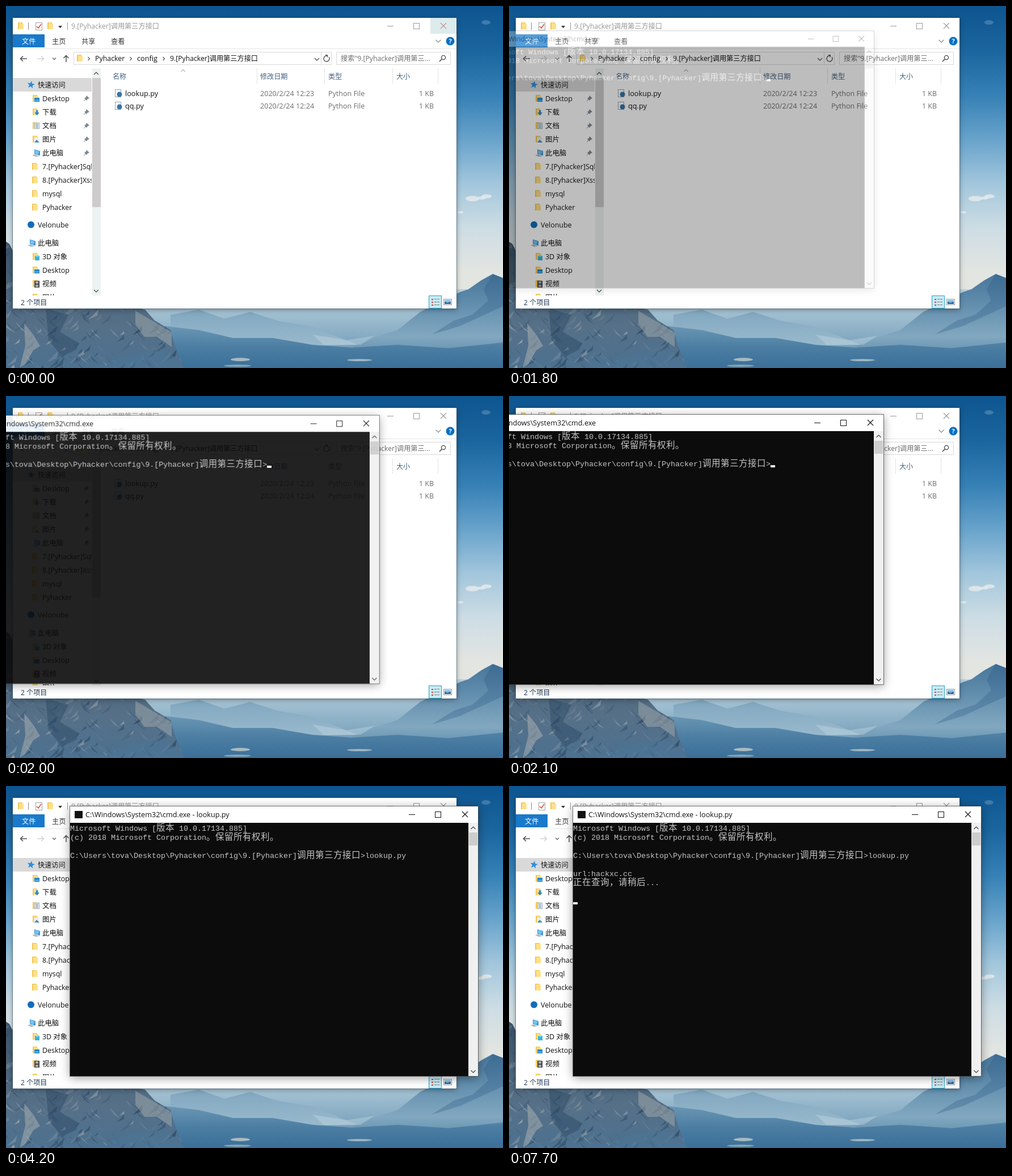
An HTML page with a canvas that plays this animation: 876 px wide and 639 px high, repeating every 8 s.

```html
<!DOCTYPE html>
<html lang="zh">
<head>
<meta charset="utf-8">
<title>Command line lookup</title>
<style>
html, body { margin: 0; width: 100%; height: 100%; overflow: hidden; background: #0d5590; }
canvas { display: block; }
</style>
</head>
<body>
<canvas id="stage" width="876" height="639"></canvas>
<script>
const W = 876, H = 639, LOOP = 8000;
const UI = '"Open Sans", "Noto Sans CJK SC", sans-serif';
const MONO = '"Liberation Mono", "Noto Sans CJK SC", monospace';
const SERIF = '"Liberation Serif", "Noto Sans CJK SC", serif';
const FOLDER = '9.[Pyhacker]调用第三方接口';
const PATH = 'C:\\Users\\tova\\Desktop\\Pyhacker\\config\\' + FOLDER;

let g = document.getElementById('stage').getContext('2d');

function layer(w, h, paint) {
  const c = document.createElement('canvas');
  c.width = w;
  c.height = h;
  const before = g;
  g = c.getContext('2d');
  paint();
  g = before;
  return c;
}

function box(x, y, w, h, color) {
  g.fillStyle = color;
  g.fillRect(x, y, w, h);
}

function frame(x, y, w, h, color) {
  g.strokeStyle = color;
  g.lineWidth = 1;
  g.strokeRect(x + .5, y + .5, w - 1, h - 1);
}

function trace(p) {
  g.beginPath();
  for (let i = 0; i < p.length; i += 2) g.lineTo(p[i], p[i + 1]);
}

function poly(color, ...p) {
  g.fillStyle = color;
  trace(p);
  g.fill();
}

function line(color, width, ...p) {
  g.strokeStyle = color;
  g.lineWidth = width;
  trace(p);
  g.stroke();
}

function disc(x, y, rx, color, ry = rx) {
  g.fillStyle = color;
  g.beginPath();
  g.ellipse(x, y, rx, ry, 0, 0, 7);
  g.fill();
}

// y is the middle of the text line
function text(s, x, y, color = '#111', size = 12.4, align = 'left') {
  g.font = size + 'px ' + UI;
  g.fillStyle = color;
  g.textAlign = align;
  g.fillText(s, x, y + 4.5);
}

function chevron(x, y, dir, color = '#555', r = 4, width = 1.2) {
  g.save();
  g.translate(x, y);
  g.rotate({ down: 0, left: 1, up: 2, right: 3 }[dir] * Math.PI / 2);
  line(color, width, -r, -r / 2, 0, r / 2, r, -r / 2);
  g.restore();
}

function arrow(x, y, angle, color) {
  g.save();
  g.translate(x, y);
  g.rotate(angle);
  line(color, 1.4, 6, 0, -5.5, 0);
  line(color, 1.4, -1, -4.5, -5.5, 0, -1, 4.5);
  g.restore();
}

function windowButtons(x, y, color, closeColor = color) {
  line(color, 1, x - 5, y + .5, x + 6, y + .5);
  frame(x + 41, y - 5, 11, 11, color);
  line(closeColor, 1.1, x + 89, y - 5, x + 99, y + 5);
  line(closeColor, 1.1, x + 99, y - 5, x + 89, y + 5);
}

function linear(y0, y1, ...colors) {
  const grad = g.createLinearGradient(0, y0, 0, y1);
  colors.forEach((c, i) => grad.addColorStop(i / (colors.length - 1), c));
  return grad;
}

function random(seed) {
  return () => (seed = (seed * 16807) % 2147483647) / 2147483647;
}

// ---------- wallpaper ----------

function paintRocks() {
  g.save();
  trace([0, 416, 6, 420, 14, 436, 120, 470, 225, 532, 245, 536, 262, 555, 290, 572, 298, 600, 314, 639, 0, 639]);
  g.clip();
  box(0, 400, 400, 239, linear(416, 639, '#3a5268', '#4a6379', '#567088', '#4c7190'));
  const rnd = random(77);
  const tones = ['#2a425a', '#334d66', '#6a7f91', '#94a0a8', '#b0b5b6', '#2c4c69'];
  for (let i = 0; i < 420; i++) {
    const x = rnd() * 320 - 10, y = 420 + rnd() * 215;
    const len = 6 + rnd() * 18, side = rnd() < .4 ? -1 : 1, thick = 1 + rnd() * 4;
    g.globalAlpha = .25 + rnd() * .45;
    poly(tones[Math.floor(rnd() * 6)], x, y, x + side * len * .5, y + len * .55, x + side * len, y + len, x + side * len * .3 + thick, y + len * .6);
  }
  g.globalAlpha = .5;
  poly('#2e4b66', 70, 534, 110, 545, 95, 575, 130, 596, 100, 620, 75, 590);
  poly('#a2a9ac', 228, 538, 262, 558, 292, 576, 292, 602, 266, 584, 244, 584, 228, 562);
  poly('#b0b3b4', 32, 560, 48, 580, 60, 600, 48, 608, 34, 632, 24, 639, 34, 600);
  poly('#4c7698', 150, 639, 220, 614, 285, 608, 314, 639);
  g.restore();
}

function paintWallpaper() {
  box(0, 0, W, H, linear(0, 470, '#0d5590', '#1b659e', '#3580b5', '#68a3cb', '#a2c6dc', '#cddde4', '#e3e5e1'));
  for (const [x, y, r] of [[847, 336, 9], [838, 339, 7], [822, 340, 12], [801, 364, 5]]) disc(x, y, r, 'rgba(240,240,238,.7)', r * .4);
  disc(846, 29, 8, 'rgba(150,180,205,.35)', 4);

  box(0, 500, W, 139, linear(500, 639, '#bdd2dd', '#9fbed0', '#7fa6c0', '#5686a9'));
  poly(linear(530, 605, '#7ea5be', '#9bbbce'),
    290, 545, 340, 536, 385, 552, 430, 540, 480, 556, 540, 566, 620, 598, 290, 605);
  poly(linear(473, 639, '#47759a', '#638fae', '#82a8c0', '#4f7fa3'),
    600, 606, 640, 588, 690, 572, 730, 540, 770, 520, 800, 505, 815, 500, 838, 484, 858, 473, 876, 480, 876, 639, 600, 639);
  poly('rgba(40,88,128,.3)', 858, 473, 842, 500, 850, 520, 822, 545, 790, 555, 750, 580, 800, 565, 876, 530, 876, 480);
  poly('rgba(200,220,230,.35)', 540, 580, 600, 590, 650, 582, 625, 598, 560, 598);
  poly(linear(565, 639, '#6a96b3', '#4c7ea3', '#3b6f98'),
    280, 565, 340, 572, 400, 586, 470, 586, 540, 598, 610, 603, 690, 598, 780, 604, 876, 594, 876, 639, 280, 639);
  disc(413, 624, 17, '#a7bac0', 3);
  disc(408, 635, 24, '#83a4b6', 2);
  disc(623, 625, 22, '#9db6c0', 2);
  paintRocks();
}

// ---------- file manager ----------

function folder(x, y) {
  poly('#f2c755', x, y - 6, x + 8, y - 6, x + 8, y + 6, x, y + 6);
  poly('#ffe08a', x + 2, y - 5, x + 10, y - 4, x + 10, y + 6, x + 2, y + 6);
}

function page(x, y, w = 10, h = 13) {
  box(x, y - h / 2, w, h, '#fff');
  frame(Math.round(x), Math.round(y - h / 2), w, h, '#9aa3ab');
}

function monitor(x, y) {
  poly('#3f95d4', x + 3, y - 6, x + 13, y - 3, x + 13, y + 5, x + 3, y + 2);
  poly('#76c3f2', x + 4, y - 5, x + 12, y - 2, x + 9, y + 3, x + 4, y + 1);
  poly('#a9b4bc', x - 1, y + 4, x + 4, y + 3, x + 12, y + 6, x + 5, y + 7);
}

function star(x, y) {
  const p = [];
  for (let i = 0; i < 10; i++) {
    const a = i * Math.PI / 5 - 1.4, r = i % 2 ? 3 : 7;
    p.push(x + r * Math.cos(a), y + r * Math.sin(a));
  }
  poly('#2c8fe0', ...p);
}

function pin(x, y) {
  poly('#7d8790', x, y - 5, x + 5, y, x + 2, y + 1, x, y + 4, x - 4, y, x - 1, y - 2);
  line('#7d8790', 1, x - 2, y + 2, x - 5, y + 5);
}

const icons = {
  folder: y => folder(46, y),
  desktop: y => { folder(47, y); box(50, y - 1, 9, 7, '#1e88d2'); box(51, y + 3, 7, 1, '#9bd4f7'); },
  down: y => { folder(47, y); box(53, y - 3, 3, 5, '#2387d6'); poly('#2387d6', 50, y + 1, 59, y + 1, 54.5, y + 6); },
  doc: y => { folder(47, y); page(50, y, 9, 11); for (let i = -3; i < 5; i += 2) box(52, y + i, 5, 1, '#5b8fb9'); },
  pic: y => { folder(47, y); box(50, y - 2, 9, 8, '#e8f3fa'); poly('#4d8bb5', 50, y + 6, 54, y + 1, 59, y + 6); },
  pc: y => monitor(47, y),
  cube: y => { folder(47, y); box(51, y - 1, 8, 8, '#38b4d8'); poly('#8be0f2', 51, y - 1, 55, y - 3, 59, y - 1, 55, y + 1); },
  video: y => { folder(47, y); box(50, y - 5, 9, 12, '#444'); box(52, y - 4, 5, 4, '#aab'); box(52, y + 2, 5, 4, '#aab'); },
};

const places = [
  ['desktop', 'Desktop', 163, 1], ['down', '下载', 187, 1], ['doc', '文档', 211, 1], ['pic', '图片', 235, 1],
  ['pc', '此电脑', 259, 1], ['folder', '7.[Pyhacker]Sql', 283], ['folder', '8.[Pyhacker]Xss', 307],
  ['folder', 'mysql', 331], ['folder', 'Pyhacker', 355], ['cube', '3D 对象', 442],
  ['desktop', 'Desktop', 466], ['video', '视频', 490], ['pic', '图片', 514],
];

function paintSidebar() {
  g.save();
  g.beginPath();
  g.rect(12, 110, 139, 401);
  g.clip();
  box(12, 127, 139, 24, '#d9d9d9');
  star(44, 139);
  text('快速访问', 56, 139, '#111', 12.2);
  for (const [icon, name, y, pinned] of places) {
    icons[icon](y);
    text(name, 64, y);
    if (pinned) pin(142, y);
  }
  disc(44, 386, 6, '#0f6cbd');
  text('Velonube', 56, 386);
  monitor(39, 418);
  text('此电脑', 56, 418);
  g.restore();
  box(152, 110, 15, 401, '#edf3f2');
  box(152, 127, 15, 228, '#cdcbcb');
  chevron(159, 119, 'up', '#444');
  chevron(159, 503, 'down', '#444');
}

function paintFiles() {
  const head = '#43607f';
  [['名称', 188], ['修改日期', 448], ['类型', 568], ['大小', 688]].forEach(([s, x]) => text(s, x, 124, head, 12.1));
  chevron(312, 114, 'up', '#777', 3.5, 1);
  for (const x of [442, 561, 681, 761]) box(x, 110, 1, 27, '#e2e2e2');
  [['lookup.py', 154, '23'], ['qq.py', 176, '24']].forEach(([name, y, min]) => {
    page(192, y, 11, 14);
    disc(200, y + 2, 4.5, '#3774a8');
    text(name, 210, y, '#111', 12.7);
    text('2020/2/24 12:' + min, 448, y, '#6d6d6d', 12.6);
    text('Python File', 568, y, '#6d6d6d', 12.5);
    text('1 KB', 754, y, '#6d6d6d', 12.4, 'right');
  });
}

function paintAddress(t, editing) {
  arrow(31, 93, 0, '#444');
  arrow(61, 93, Math.PI, '#d0d0d0');
  chevron(85, 93, 'down', '#666', 3, 1.3);
  arrow(106, 93, Math.PI / 2, '#444');

  frame(119, 81, 455, 23, '#d9d9d9');
  box(555, 82, 1, 21, '#d9d9d9');
  if (editing) frame(120, 81, 436, 23, '#0078d7');
  folder(125, 92);
  if (!editing) {
    [146, 220, 278].forEach(x => chevron(x, 93, 'right', '#555', 3));
    text('Pyhacker', 157, 92);
    text('config', 231, 92, '#111', 12.7);
    text(FOLDER, 289, 92, '#111', 12.2);
  } else if (t < 1500) {
    box(143, 84, 389, 17, '#0078d7');
    text(PATH, 143, 92, '#fff', 12.35);
    if (t < 1100) box(531, 84, 1, 17, '#111');
  } else {
    text('cmd', 143, 92);
    box(169, 84, 1, 17, '#111');
  }
  chevron(548, 94, 'down', '#555', 4, 1.3);
  g.strokeStyle = '#555';
  g.lineWidth = 1.4;
  g.beginPath();
  g.arc(565, 93, 5, -.6, 4.4);
  g.stroke();
  poly('#555', 562, 86, 567, 86, 567, 91);

  frame(582, 81, 202, 23, '#d9d9d9');
  text('搜索"9.[Pyhacker]调用第三...', 590, 92, '#6d6d6d', 12.2);
  g.strokeStyle = '#444';
  g.lineWidth = 1.3;
  g.beginPath();
  g.arc(771, 91, 3.6, 0, 7);
  g.stroke();
  line('#444', 1.6, 768, 94, 764, 98);
}

function paintExplorer(t) {
  const editing = t >= 500 && t < 1800;
  const raised = t >= 600 && t < 1800;
  const ink = editing ? '#111' : '#999';
  g.save();
  g.shadowColor = raised ? 'rgba(0,0,0,.5)' : 'rgba(0,0,0,.35)';
  g.shadowBlur = raised ? 18 : 9;
  g.shadowOffsetY = 2;
  box(12, 21, 782, 513, '#fff');
  g.restore();
  frame(11, 20, 784, 515, 'rgba(50,80,105,.55)');

  folder(21, 35);
  box(39, 29, 1, 13, '#888');
  page(52, 36, 12, 14);
  line('#d9532c', 1.6, 54, 36, 57, 39, 62, 32);
  folder(73, 35);
  poly('#333', 92, 35, 99, 35, 95.5, 39);
  box(108, 29, 1, 13, '#999');
  text(FOLDER, 115, 35, ink, 12.2);
  if (t < 100) box(748, 21, 46, 28, '#dcebec');
  windowButtons(677, 35, ink, t < 100 ? '#c58f8f' : ink);

  box(12, 50, 56, 23, '#1979ca');
  text('文件', 28, 62, '#fff', 12.2);
  [['主页', 81], ['共享', 133], ['查看', 185]].forEach(([s, x]) => text(s, x, 62, '#333', 12.2));
  box(12, 75, 782, 1, '#e3e4e5');
  chevron(762, 62, 'down', '#8a8a8a', 4.5);
  disc(783, 62, 7.5, '#0a6fc2');
  g.font = 'bold 11px ' + UI;
  g.fillStyle = '#fff';
  g.textAlign = 'center';
  g.fillText('?', 783, 66);

  paintAddress(t, editing);
  paintSidebar();
  paintFiles();

  text('2 个项目', 26, 523, '#1e395b', 12.1);
  box(745, 512, 23, 22, '#c9eaf5');
  frame(745, 511, 23, 23, '#2aa3c9');
  for (const y of [517, 522, 527]) {
    box(750, y, 3, 2, '#c0504d');
    box(755, y, 4, 1, '#777');
    box(760, y, 4, 1, '#777');
  }
  box(771, 517, 15, 11, '#fff');
  frame(771, 517, 15, 11, '#8b98a3');
  box(773, 519, 11, 7, '#85bce5');
  poly('#2d5f8b', 773, 526, 773, 522, 778, 524, 784, 522, 784, 526);
}

// ---------- input method popup ----------

function paintPopup(t) {
  const typed = t < 1300 ? 'c' : 'cmd';
  g.beginPath();
  g.roundRect(540.5, 168.5, 360, 74, 9);
  g.fillStyle = linear(168, 243, '#ececec', '#e2e2e2', '#dedede');
  g.fill();
  g.strokeStyle = '#9f9f9f';
  g.lineWidth = 3;
  g.stroke();
  box(549, 204, 327, 1, '#c9c9c9');
  box(549, 205, 327, 1, '#f4f4f4');
  g.textAlign = 'left';
  g.font = 'bold 15px "Liberation Sans", sans-serif';
  g.fillStyle = '#777';
  g.fillText(typed, 550, 197);
  box(550 + Math.round(g.measureText(typed).width), 182, 1, 18, '#7a1020');

  const words = typed === 'c' ? ['才', '出', '从', '吃', '错', '次', '车'] : ['cmd', '充满电', '才买的', '聪明的', '触摸到'];
  const step = typed === 'c' ? 45 : 68.4;
  words.forEach((word, i) => {
    const first = i === 0;
    g.font = (first && typed === 'cmd' ? 14 : 15.2) + 'px ' + SERIF;
    g.fillStyle = first ? '#6b1a26' : '#8c8c8c';
    g.fillText(i + 1 + '.' + word, first ? 551 : 596 + (i - 1) * step, 226);
  });
  poly('#b0b0b0', 871, 221, 877, 216, 877, 226);
}

// ---------- console ----------

const PAD = 40, CW = 719, CH = 476;

function put(s, row) {
  let x = 0;
  for (const ch of s) {
    const wide = ch.charCodeAt(0) > 255;
    g.font = (wide ? 15.5 : 13.4) + 'px ' + MONO;
    g.fillText(ch, x, 43 + row * 16);
    x += wide ? 16 : 8;
  }
  return x;
}

// one key each 100 ms, with a short pause after the fourth
function typedUrl(t) {
  const keys = Math.min(4, (t - 5100) / 100) + Math.max(0, (t - 5600) / 100);
  return 'hackxc.cc'.slice(0, Math.max(0, keys));
}

function paintConsole(t) {
  g.translate(PAD, PAD);
  g.save();
  g.shadowColor = 'rgba(0,0,0,.4)';
  g.shadowBlur = 16;
  g.shadowOffsetY = 3;
  box(0, 0, CW, CH, '#fff');
  g.restore();
  box(8, 8, 14, 13, '#111');
  text('C:\\Windows\\System32\\cmd.exe' + (t < 3100 ? '' : ' - lookup.py'), 27, 14.5, '#111', 12.65);
  windowButtons(602, 14, '#111');
  box(0, 29, 702, CH - 29, '#0c0c0c');
  box(702, 29, 17, CH - 29, '#f0f0f0');
  box(703, 46, 15, 23, '#cdcdcd');
  chevron(710.5, 38, 'up', '#444');
  chevron(710.5, 468, 'down', '#444');
  frame(-1, -1, CW + 2, CH + 2, 'rgba(70,70,70,.75)');

  g.fillStyle = '#c4c4c4';
  g.textAlign = 'left';
  put('Microsoft Windows [版本 10.0.17134.885]', 0);
  put('(c) 2018 Microsoft Corporation。保留所有权利。', 1);
  const command = t < 2600 ? '' : t < 2800 ? 'lo' : 'lookup.py';
  let row = 3, x = put(PATH + '>' + command, row);
  let cursor = t < 3100;
  if (t >= 4300) {
    row = 5;
    x = put('url:' + typedUrl(t), row);
    cursor = t < 4700 || t >= 5200;
  }
  if (t >= 6200) {
    put('正在查询，请稍后...', 6);
    row = 8;
    x = 0;
    cursor = t < 7200 || t >= 7700;
  }
  if (cursor) box(x, 41 + row * 16, 8, 4, '#f2f2f2');
}

function showConsole(t) {
  const rest = Math.pow(1 - Math.min(1, (t - 1750) / 350), 1.85);
  const scale = 1 - .063 * rest;
  const [x, y] = t < 4200 ? [-59, 33] : [113, 36];
  const img = layer(CW + PAD * 2, CH + PAD * 2, () => paintConsole(t));
  g.save();
  g.globalAlpha = Math.min(1, (t - 1715) / 315);
  g.translate(x + CW / 2, y + CH / 2);
  g.scale(scale, scale);
  g.drawImage(img, -CW / 2 - PAD, -CH / 2 - PAD);
  g.restore();
}

const wallpaper = layer(W, H, paintWallpaper);
let shown = -1;

function tick(now) {
  const t = Math.floor((now % LOOP) / 100) * 100;
  if (t !== shown) {
    shown = t;
    g.drawImage(wallpaper, 0, 0);
    paintExplorer(t);
    if (t >= 900 && t < 1500) paintPopup(t);
    if (t >= 1800) showConsole(t);
  }
  requestAnimationFrame(tick);
}

requestAnimationFrame(tick);
</script>
</body>
</html>
```
